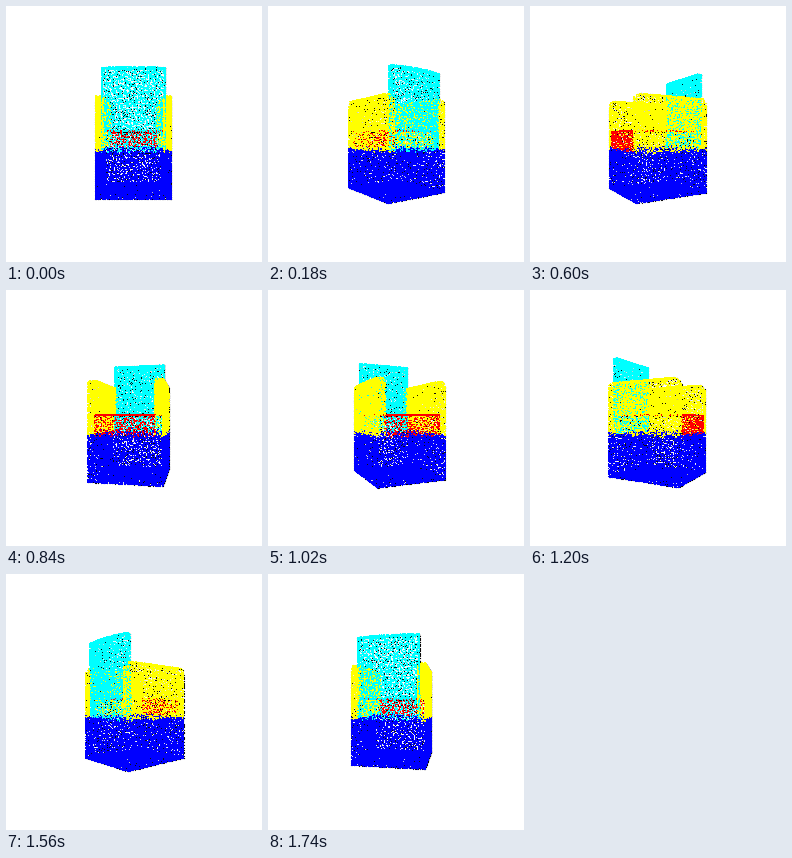
These frames come from a looping animation (256x256 px, 1800 ms). A matplotlib script:

```python
import numpy as np
import matplotlib.pyplot as plt
from matplotlib.animation import FuncAnimation

SIZE, FRAMES, LOOP = 256, 30, 1800
CAM = 250            # camera distance, in stage pixels
STEP = 2.0           # mean spacing of the points
CENTER = 127.4
BLUE, YELLOW, CYAN, RED = np.array(
    [[0, 0, 1], [1, 1, 0], [0, 1, 1], [1, 0, 0]], float)

# x: half widths, y: heights (down), z: depths (back is positive)
W, ARM, BACK = 32.7, 26.5, 27.5
TOP, ARM_TOP, SEAT, SKIRT, FLOOR = -57, -32.7, -2, 16.5, 56.7
FRONT, REAR = -38.5, 35

rng = np.random.default_rng(4)
cloud, tints = [], []


def sheet(origin, u, v, color):
    """Scatter jittered grid points over a parallelogram."""
    origin, u, v = (np.array(a, float) for a in (origin, u, v))
    nu, nv = (max(2, round(np.linalg.norm(a) / STEP) + 1) for a in (u, v))
    a, b = np.meshgrid(np.linspace(0, 1, nu), np.linspace(0, 1, nv))
    a = np.clip(a + rng.uniform(-.45, .45, a.shape) / nu, 0, 1).ravel()
    b = np.clip(b + rng.uniform(-.45, .45, b.shape) / nv, 0, 1).ravel()
    pts = origin + a[:, None] * u + b[:, None] * v
    cloud.append(pts)
    tints.append(np.tile(color, (len(pts), 1)))


def round_arm(pts, r=4):
    """Cut the upper corners of the arms to a radius."""
    _, y, z = pts.T
    dy = np.maximum(ARM_TOP + r - y, 0)
    dz = np.maximum(np.maximum(FRONT + r - z, z - REAR + r), 0)
    return np.hypot(dy, dz) <= r


depth = REAR - FRONT
# base
for z in (FRONT, REAR):
    sheet((-W, SKIRT, z), (2 * W, 0, 0), (0, FLOOR - SKIRT, 0), BLUE)
for s in (-1, 1):
    sheet((s * W, SKIRT, FRONT), (0, 0, depth), (0, FLOOR - SKIRT, 0), BLUE)
sheet((-W, FLOOR, FRONT), (2 * W, 0, 0), (0, 0, depth), BLUE)
# arms
for s in (-1, 1):
    sheet((s * W, ARM_TOP, FRONT), (0, 0, depth), (0, SKIRT - ARM_TOP, 0), YELLOW)
    sheet((s * ARM, ARM_TOP, FRONT), (0, 0, depth), (0, SEAT - ARM_TOP, 0), YELLOW)
    sheet((s * ARM, ARM_TOP, FRONT + 4), (s * (W - ARM), 0, 0), (0, 0, depth - 8), YELLOW)
    for z in (FRONT, REAR):
        sheet((s * ARM, ARM_TOP + 4, z), (s * (W - ARM), 0, 0),
              (0, SKIRT - ARM_TOP - 4, 0), YELLOW)
# seat
sheet((-ARM, SEAT, FRONT), (2 * ARM, 0, 0), (0, 0, depth - 7), RED)
sheet((-ARM, SEAT, FRONT), (2 * ARM, 0, 0), (0, SKIRT - SEAT, 0), RED)
# back, slightly reclined
fall = (0, SKIRT - TOP, -2)
sheet((-BACK, TOP, 37), (2 * BACK, 0, 0), fall, CYAN)
sheet((-BACK, TOP, 29), (2 * BACK, 0, 0), (0, SEAT - TOP, -1), CYAN)
sheet((-BACK, TOP, 29), (2 * BACK, 0, 0), (0, 0, 8), CYAN)
for s in (-1, 1):
    sheet((s * BACK, TOP, 29), (0, 0, 8), fall, CYAN)

points, colors = np.vstack(cloud), np.vstack(tints)
arm = (colors == YELLOW).all(1)
keep = ~arm | round_arm(points)
points, colors = points[keep], colors[keep]
# bow the rear of the back
back = (colors == CYAN).all(1)
bow = 1 - .4 * (points[back, 0] / BACK) ** 2
points[back, 2] = 28 + (points[back, 2] - 28) * bow
# ragged seam between the base and the parts above it
colors[points[:, 1] > SKIRT + rng.normal(-.6, 1.3, len(points))] = BLUE

fig = plt.figure(figsize=(SIZE / 72, SIZE / 72), dpi=72, facecolor="white")
ax = fig.add_axes([0, 0, 1, 1])
ax.set(xlim=(0, SIZE), ylim=(SIZE, 0))
ax.axis("off")
style = dict(marker="o", lw=0, antialiased=False, snap=False)
rims = ax.scatter([], [], s=1.4, c="black", **style)
dots = ax.scatter([], [], s=.36, **style)


def draw(i):
    t = 2 * np.pi * i / FRAMES
    x, y, z = points.T
    far = z * np.cos(t) - x * np.sin(t)
    scale = 1 / (1 - far / CAM)
    spots = np.column_stack([(x * np.cos(t) + z * np.sin(t)) * scale,
                             y * scale]) + CENTER
    order = np.argsort(far)
    rims.set_offsets(spots)
    dots.set_offsets(spots[order])
    dots.set_facecolor(colors[order])
    return rims, dots


anim = FuncAnimation(fig, draw, frames=FRAMES, interval=LOOP / FRAMES,
                     repeat=True, repeat_delay=0, blit=False)
plt.show()
```
